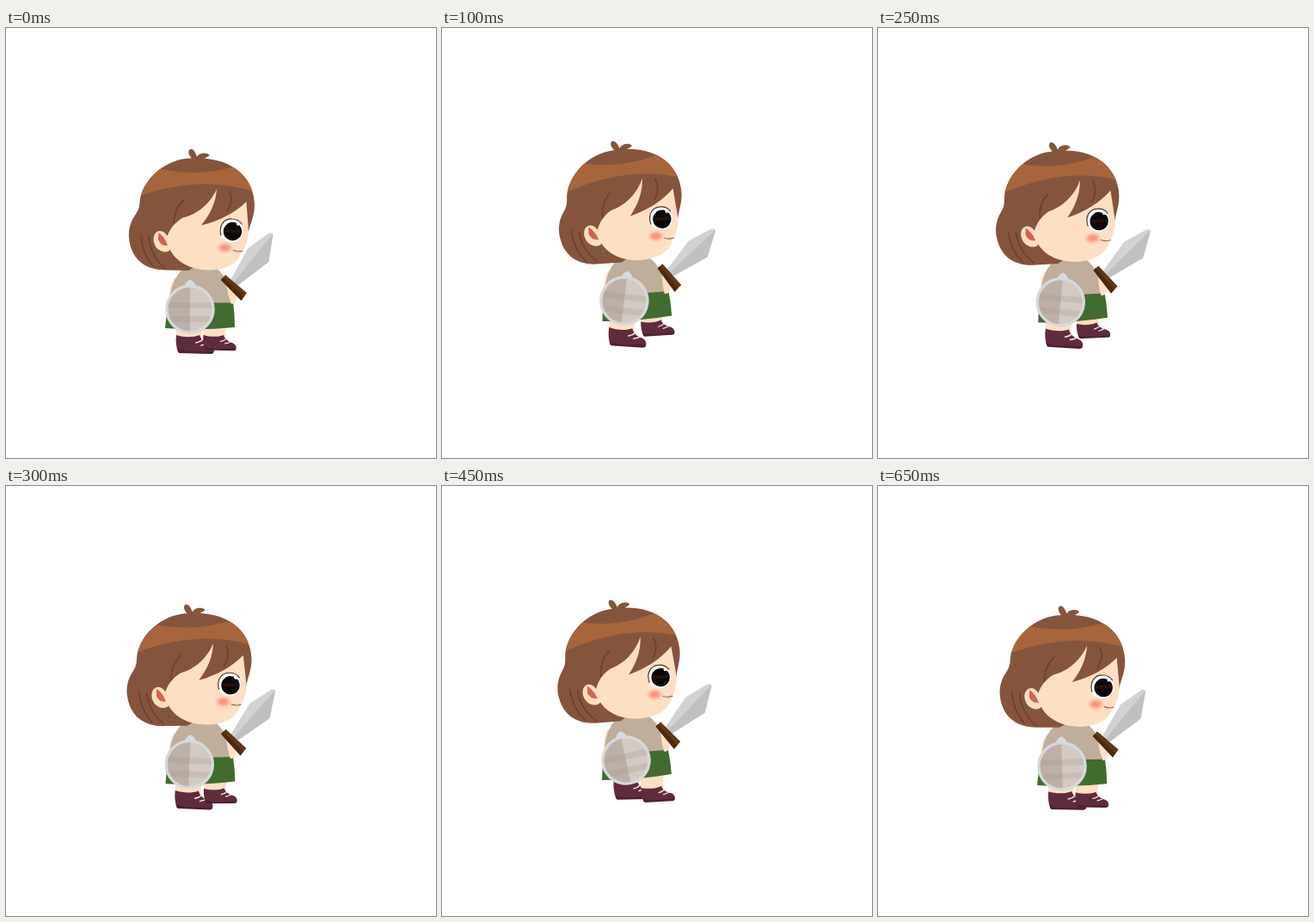
These frames come from a looping animation (500 px wide and 500 px high, 700 ms). An HTML page without scripts:

```html
<!DOCTYPE html>
<html lang="en">
<head>
<meta charset="utf-8">
<title>Marching knight</title>
<style>
  @property --t { syntax: "<number>"; inherits: true; initial-value: 0; }

  html, body { margin: 0; width: 100%; height: 100%; overflow: hidden; background: #fff; }

  /* --t counts 50 ms ticks; --a and --b are the lifts of the first and second step */
  svg {
    display: block; width: 100%; height: 100%;
    animation: tick 700ms steps(14) infinite;
    --a: max(0, 1 - .3 * max(var(--t) - 10 / 3, 10 / 3 - var(--t)));
    --b: max(0, 1 - .3 * max(var(--t) - 10, 10 - var(--t)));
  }
  @keyframes tick { from { --t: 0; } to { --t: 14; } }

  .part {
    transform:
      translate(calc((var(--a) * var(--ax) + var(--b) * var(--bx)) * 1px),
                calc((var(--a) * var(--ay) + var(--b) * var(--by)) * 1px))
      rotate(calc((var(--a) * var(--ar) + var(--b) * var(--br)) * 1deg));
  }
  .near  { transform-origin: 218px 368px; --ax: -7;   --ay: -13.5; --ar: 4;  --bx: 3;  --by: -20;   --br: -4; }
  .far   { transform-origin: 248px 366px; --ax: 4;    --ay: -28.5; --ar: -8; --bx: 4;  --by: -11;   --br: -7; }
  .body  { transform-origin: 226px 349px; --ax: 2.3;  --ay: -18; --ar: -6.7; --bx: 1.5; --by: -14.3; --br: -6; }
  .sword { transform-origin: 265px 301px; --ax: -1;   --ay: -19; --ar: 13.5; --bx: -3; --by: -17;   --br: 7; }
  .shield { transform-origin: 214px 327px; --ax: -3.5; --ay: -16.5; --ar: 11; --bx: 0; --by: -11.5; --br: -17; }
  .head  { transform-origin: 225px 280px; --ax: -5.6; --ay: -18; --ar: -9;   --bx: -6.5; --by: -14.5; --br: -8.6; }

  .skin { fill: #fddfc3; }
  .hair { fill: #85543d; }
  .line { fill: none; stroke-linecap: round; }
</style>
</head>
<body>
<svg viewBox="0 0 500 500">
  <defs>
    <radialGradient id="blush">
      <stop offset="0" stop-color="#fa8573"/>
      <stop offset=".45" stop-color="#fb9c88" stop-opacity=".85"/>
      <stop offset="1" stop-color="#fddfc3" stop-opacity="0"/>
    </radialGradient>
    <clipPath id="disc"><circle cx="214" cy="327" r="25.500"/></clipPath>
    <clipPath id="crown">
      <path id="hair" d="M213 151.500C187 153 163 172 156.500 196C154.500 204 157 208 150.500 217C144 226 141.500 237 143.500 248C147 270 163 281.500 186 281.500L212 282L277 246L282 237C284 227 289 219 289 206C289 176 265 148 213 151.500Z"/>
    </clipPath>
    <g id="leg">
      <path class="skin" d="M0-22H32L29 3H0Z"/>
      <path fill="#602b3d" d="M0 0C9 3 20 3 27 0C29 6 33 9 39 11C44 13 45 18 43 21L2 20C0 14-1 7 0 0Z"/>
      <path fill="#4d2033" d="M1 16C8 18 12 19 17 19H43C44 21 42 22 40 22L3 21Z"/>
      <path class="line" stroke="#f1e8ea" stroke-width="1.500" d="M23 9Q28 8 31 5M29 12Q34 11 37 9"/>
    </g>
  </defs>

  <g class="part near"><use href="#leg" transform="translate(198 357)"/></g>
  <g class="part far"><use href="#leg" transform="translate(229.500 357) scale(.87 .83)"/></g>

  <g class="part body">
    <path class="skin" d="M195 291Q189 304 190 316H200V291Z"/>
    <path fill="#426b30" d="M191 318H264Q266 332 266 348Q226 352 185 349Q186 333 191 318Z"/>
    <path fill="#bfae9b" d="M209 277H241C254 284 261 302 262 319.500H191C190 303 196 288 209 277Z"/>
  </g>

  <g class="part sword">
    <path class="skin" d="M256 299L268 311Q269 321 262 321Q258 311 256 299Z"/>
    <path fill="#d2d2d2" d="M261 293L281.500 256L305 239Q308 237 310 239L266 297Z"/>
    <path fill="#c0c0c0" d="M310 239Q311 240 310 244L305.500 272L270 299L264 297Z"/>
    <path fill="#603714" d="M255 287L280 308L273.500 317L250 293Z"/>
    <path fill="#4b290e" d="M252 290L276.500 312L273.500 317L250 293Z"/>
  </g>

  <g class="part shield">
    <path fill="#dadbdd" d="M206 303Q209 294 214 292.500Q219 294 222 303Z"/>
    <circle cx="214" cy="327" r="27" fill="#d2cac3" stroke="#d7d8da" stroke-width="3.500"/>
    <g clip-path="url(#disc)">
      <path fill="#bdb1a7" d="M180 295H214V360H180Z"/>
      <path fill="#a08f84" fill-opacity=".22" d="M180 319H250V326H180ZM180 335H250V342H180Z"/>
    </g>
  </g>

  <g class="part head">
    <path class="hair" d="M218 154C214 150 210 144 214 141C218 140 220.500 145 222 150C224 145 233 144 236.500 147.500C237 150 231 150 229 154Z"/>
    <use href="#hair" class="hair"/>
    <g clip-path="url(#crown)">
      <path fill="#a6653d" d="M165 160Q222 177 275 158L296 193Q230 168 150 197Z"/>
    </g>
    <g class="line" stroke="#6f402f" stroke-width="1.700">
      <path d="M207 200Q195 210 195 228"/>
      <path d="M260 190Q265 202 257 213"/>
      <path d="M157 240Q158 262 171 277"/>
      <path d="M166 242Q167 263 184 279"/>
    </g>
    <path class="skin" d="M245 187C238 204 222 217 206 220.500C196 226 188 236 187 246C190 268 211 281.500 236 281.500C257 281.500 270 273 273 262C278 257 282 246 282 236L279.500 202C266 215 249 224 227 229.500C237 217 244 204 245 187Z"/>
    <path class="skin" d="M178 236C169 238 170 253 178 258C184 262 191 261 192 255L188 242Q183 235 178 236Z"/>
    <path fill="#d8604f" d="M177.500 238Q184 242 188 253Q180 254 177 246Z"/>

    <circle cx="262" cy="235.500" r="13.500" fill="#fff"/>
    <path class="line" stroke="#4a3833" stroke-width="1.200" d="M250 241C247 229 254 221.500 263 222Q270 222 274 228"/>
    <circle cx="263.500" cy="236.500" r="10.700" fill="#0c0808"/>
    <path fill="#21120f" d="M254 234H273V238H254Z"/>
    <circle cx="270" cy="227.500" r="2.200" fill="#fff"/>
    <circle cx="256" cy="227.500" r="1.300" fill="#fff"/>

    <ellipse cx="254.500" cy="255.500" rx="12" ry="8" fill="url(#blush)"/>
    <path class="line" stroke="#93593f" stroke-width="1" d="M264 258.500Q269 261 275 259.500"/>
  </g>
</svg>
</body>
</html>
```
